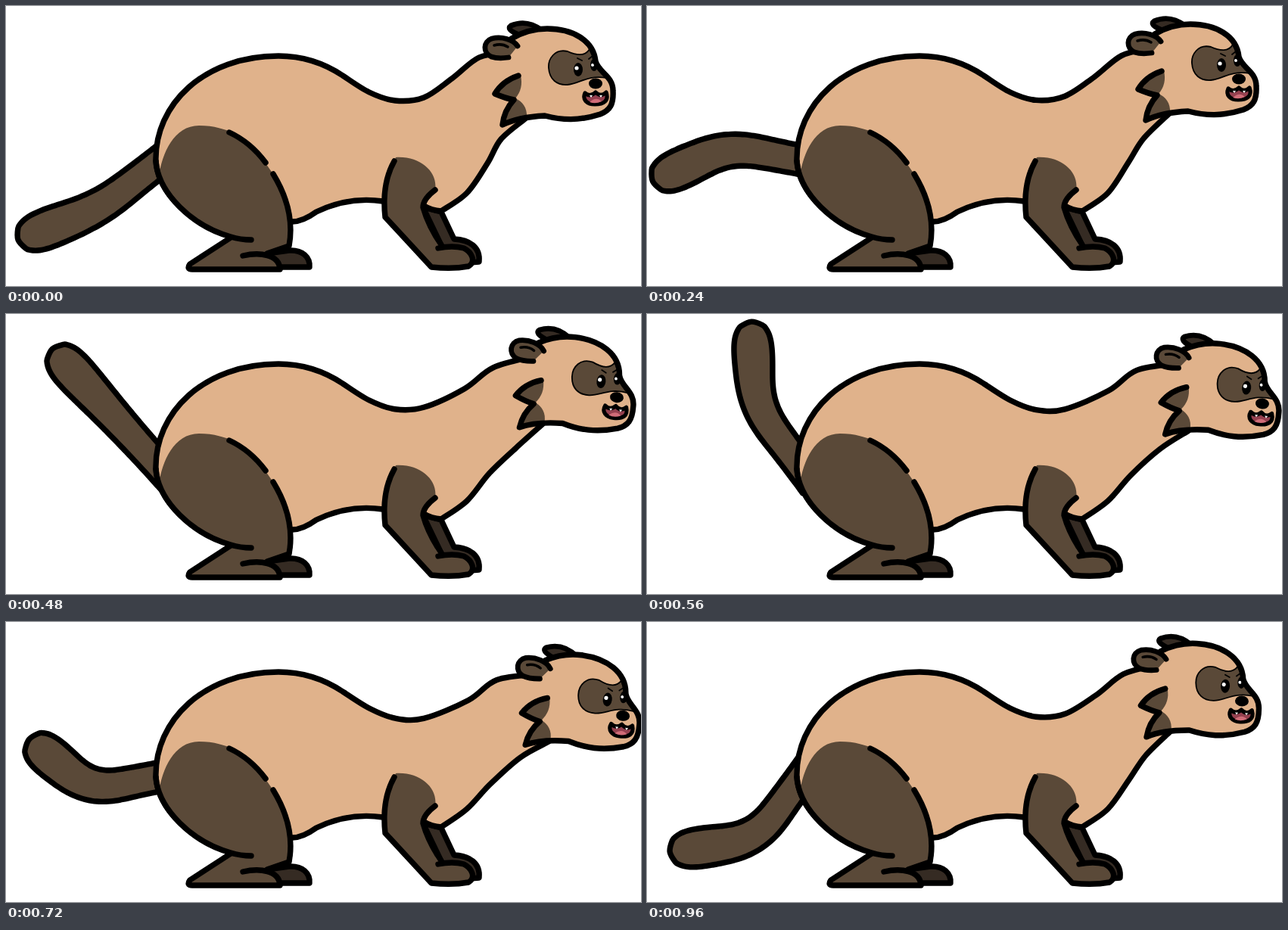
Animation of 839 by 370 pixels, one loop 1.04 s. Source, as an HTML page:

```html
<!DOCTYPE html>
<html lang="en">
<head>
<meta charset="utf-8">
<title>Ferret</title>
<style>
  html, body { margin: 0; height: 100%; overflow: hidden; background: #fff; }
  svg { display: block; width: 839px; height: 370px; }
  path { stroke: #000; stroke-width: 7.4; stroke-linecap: round; stroke-linejoin: round; fill: none; }
  .tan { fill: #e0b28b; }
  .brown { fill: #5a4938; }
  .dark { fill: #352b23; }
  .flat { stroke: none; }
  .thin { stroke-width: 1.8; }
  .ear { stroke-width: 6.8; }
</style>
</head>
<body>
<svg viewBox="0 0 839 370">
  <path id="tail" class="brown"/>

  <!-- far legs -->
  <path class="dark" d="M345 327L374 323C392 322 402 332 401 345H358Z"/>
  <path class="dark" d="M551 266L575 272L592 308C612 309 627 318 625 338L600 340L576 318Z"/>

  <path id="body" class="tan flat"/>
  <path id="bodyLine"/>

  <g id="head">
    <path class="dark ear" d="M678 38Q660 31 667 26Q688 17 708 32"/>
    <path class="tan flat" d="M664 66L668 43Q690 30 715 30C748 30 776 45 779 73C783 88 802 92 802 112C803 130 798 138 785 143C757 152 735 151 712 145L656 157Z"/>
    <path class="brown thin" d="M771 57C765 67 753 65 742 60C725 56 716 70 717 82C718 97 728 105 742 104C758 103 766 91 794 95L779 73Z"/>
    <ellipse cx="756" cy="84" rx="6" ry="9"/>
    <ellipse cx="777" cy="78" rx="5" ry="8"/>
    <circle cx="754" cy="82" r="2.6" fill="#fff"/>
    <circle cx="775" cy="78" r="2" fill="#fff"/>
    <path class="thin" d="M755 69L761 72M770 70L775 66"/>
    <ellipse cx="779" cy="102.5" rx="9" ry="7"/>
    <path d="M765 115Q772 121 779 114Q786 121 793 114C797 125 790 130 778 130C768 130 761 124 765 115Z" style="fill:#94404f;stroke-width:5.2"/>
    <path class="flat" d="M771 127Q780 119 787 126Q779 130 771 127Z" style="fill:#d06c78"/>
    <path class="flat" d="M771 118L775 118L773 121ZM784 118L788 118L786 121Z" style="fill:#fff"/>
    <path class="brown flat" d="M677 92Q656 99 646 116Q660 122 671 124Q658 138 656 157Q670 149 688 147C689 134 682 126 673 122Q684 109 680 92Z"/>
    <path d="M677 92Q656 99 646 116Q660 122 671 124Q658 138 656 157C672 149 692 146 712 145C735 151 757 152 785 143C798 138 803 130 802 112C802 92 783 88 779 73C776 45 748 30 715 30Q690 30 668 43"/>
    <path class="brown ear" d="M676 53C670 44 655 40 642 43C630 47 630 62 641 67Q650 70 664 68"/>
    <path d="M645 52Q655 49 663 54" style="stroke-width:3.5"/>
  </g>

  <!-- near hind leg -->
  <path class="brown flat" d="M202 225C206 195 222 158 255 158C275 158 290 163 301 168C325 180 335 196 353 222C375 258 379 290 374 317L345 327Q362 333 362 348H246Q238 348 243 341L297 306C245 291 206 255 202 225Z"/>
  <path d="M198 205C201 247 246 291 297 305Q310 309 324 309M295 167Q323 180 343 207M353 222C375 258 379 290 374 317L345 327M297 306L243 341Q238 348 246 348H362C361 328 335 325 313 330"/>

  <!-- near front leg -->
  <path class="brown flat" d="M513 205C500 228 498 252 501 279L562 344Q590 348 611 344C622 338 615 325 605 320L577 317L551 266L567 243C571 220 548 198 515 200Z"/>
  <path d="M513 205C500 228 498 252 501 279L562 345Q590 348 611 344C622 338 615 325 605 320Q590 316 571 320M567 243Q551 255 551 266Q558 291 576 317"/>
</svg>
<script>
const STEP = 80, STEPS = 13;
const NOSE = [779, 102], TAIL = [205, 204];
const $ = id => document.getElementById(id);

// step, nose x, nose y, head tilt, tail root angle, tail tip angle, tail length
const POSES = [
  [0, 779, 102, 0, -38, -21, 218],
  [3, 782, 96, 0, 11, -25, 207],
  [5, 800, 103, 6.5, 35, 4, 213],
  [7, 813, 118, 6.4, 53, 87, 212],
  [8, 816, 129, 7, 20, 63, 205],
  [10, 811, 115, 7, -37, 19, 191],
  [12, 786, 104, 3.3, -54, -8, 214],
];

// cyclic access: the step keeps growing past the ends
function key(i) {
  const n = POSES.length, lap = Math.floor(i / n);
  const [step, ...rest] = POSES[i - lap * n];
  return [step + lap * STEPS, ...rest];
}

// smooth pose at a step
function poseAt(step) {
  let i = POSES.length - 1;
  while (POSES[i][0] > step) i--;
  const [a, b, c, d] = [-1, 0, 1, 2].map(k => key(i + k));
  const h = c[0] - b[0], u = (step - b[0]) / h;
  return b.map((v, k) => {
    const rise = c[k] - v;
    const m = (c[k] - a[k]) / (c[0] - a[0]) * h;
    const n = (d[k] - v) / (d[0] - b[0]) * h;
    return v + u * (m + u * (3 * rise - 2 * m - n + u * (m + n - 2 * rise)));
  });
}

// smooth curve through points, continuing from the first one
function curve(pts) {
  return pts.slice(1).map((q, i) => {
    const p = pts[i], o = pts[i - 1] || p, r = pts[i + 2] || q;
    const c1 = p.map((v, k) => v + (q[k] - o[k]) / 6);
    const c2 = q.map((v, k) => v - (r[k] - p[k]) / 6);
    return 'C' + [...c1, ...c2, ...q].map(v => v.toFixed(2)).join(' ');
  }).join('');
}

function ease(u) {
  u = Math.min(1, Math.max(0, u));
  return u * u * (3 - 2 * u);
}

// a spine that bends from the root angle to the tip angle, thicker towards a round end
function tailPath(root, tip, length) {
  const n = 40, hidden = 5, upper = [], lower = [];
  const rad = Math.PI / 180, d = length / n;
  let x = TAIL[0] + hidden * d * Math.cos(root * rad);
  let y = TAIL[1] + hidden * d * Math.sin(root * rad);
  for (let i = -hidden; i <= n; i++) {
    const s = i / n;
    const a = (root + (tip - root) * ease((s - 0.22) / 0.48)) * rad;
    const w = (19 + 12 * s * s) * Math.sqrt(1 - s ** 10);
    const cos = Math.cos(a), sin = Math.sin(a);
    upper.push([x + w * sin, y - w * cos]);
    if (i < n) lower.unshift([x - w * sin, y + w * cos]);
    x -= d * cos;
    y -= d * sin;
  }
  return 'M' + upper[0] + curve([...upper, ...lower]);
}

function draw(step) {
  const [, x, y, tilt, root, tip, length] = poseAt(step);
  const dx = x - NOSE[0], dy = y - NOSE[1], turn = tilt * Math.PI / 180;

  // follow: a neck point that takes a share of the head's shift; onHead: one fixed to the head
  const follow = (px, py, kx, ky) => [px + kx * dx, py + ky * dy];
  const onHead = (px, py) => {
    const u = px - NOSE[0], v = py - NOSE[1];
    return [x + u * Math.cos(turn) - v * Math.sin(turn), y + u * Math.sin(turn) + v * Math.cos(turn)];
  };

  const throat = [onHead(686, 149), follow(654, 176, 0.7, 0.15), follow(636, 208, 0.1, 0.3), [609, 247], [575, 271]];
  const nape = [[445, 92], [480, 114], follow(514, 125, 0, 0.1), follow(552, 121, 0, 0.3),
    follow(589, 96, 0.6, 0.35), follow(625, 68, 0.65, 0.4), onHead(662, 62)];
  const line = 'M' + throat[0] + curve(throat) +
    'Q562 270 552 264L498 258C465 253 435 260 410 272Q392 285 378 285' +
    'L300 305C246 291 201 247 198 205C196 130 262 66 360 66C397 66 424 78 445 92' + curve(nape);

  $('tail').setAttribute('d', tailPath(root, tip, length));
  $('body').setAttribute('d', line + 'L' + onHead(700, 70) + 'Z');
  $('bodyLine').setAttribute('d', line);
  $('head').setAttribute('transform',
    `translate(${x} ${y}) rotate(${tilt}) translate(${-NOSE[0]} ${-NOSE[1]})`);
}

function tick() {
  draw(Math.floor(performance.now() / STEP) % STEPS);
  requestAnimationFrame(tick);
}
tick();
</script>
</body>
</html>
```
